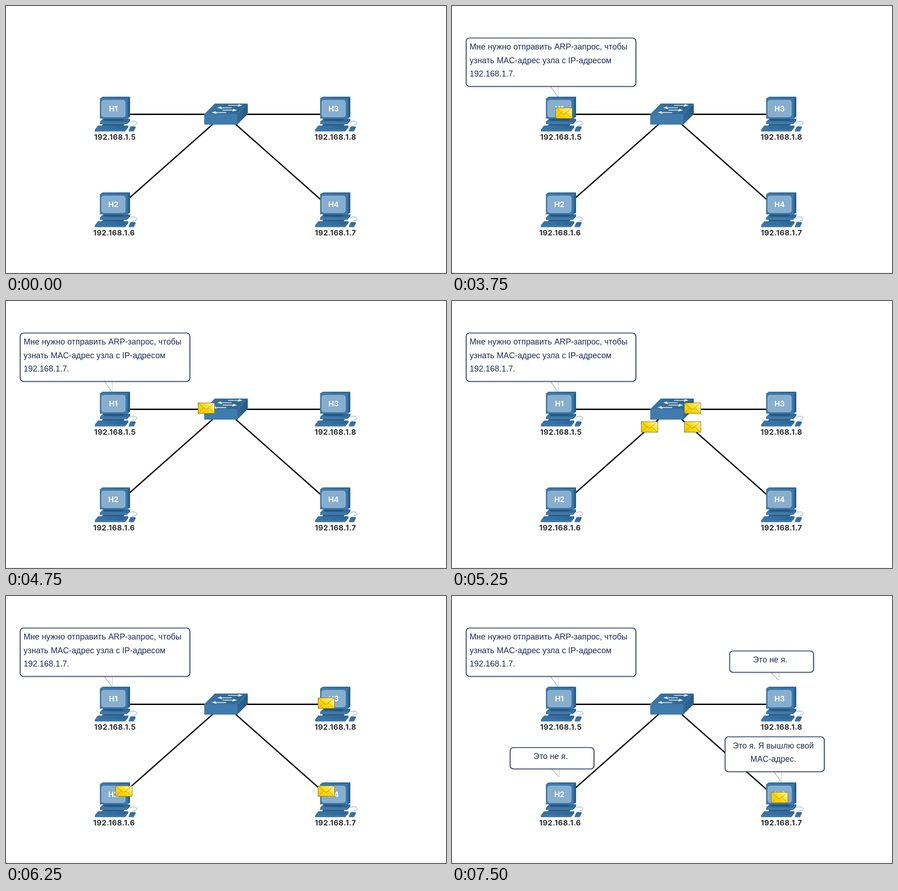
Animation of 961x583 px, one loop 8000 ms. Source, as an HTML page with a canvas:

```html
<!DOCTYPE html>
<html lang="ru">
<head>
<meta charset="utf-8">
<title>ARP</title>
<style>
html, body { margin: 0; width: 100%; height: 100%; overflow: hidden; background: #fff; }
canvas { display: block; width: 961px; height: 583px; }
</style>
</head>
<body>
<canvas id="stage" width="961" height="583"></canvas>
<script>
const ctx = document.getElementById('stage').getContext('2d');
const LOOP = 8000, STEP = 250;
const ASK = 1500, SEND = 3750, FLOOD = 5000, REPLY = 6500;
const NAVY = '#1c2b57';
const BOLD = '"Inter", sans-serif';
const BODY = '17.8px "Liberation Sans", Arial, sans-serif';
const LEFT = 194, RIGHT = 675, TOP = 198, BOTTOM = 407;

const hosts = [
  { x: LEFT, y: TOP, ip: '192.168.1.5', ipX: 238 },
  { x: LEFT, y: BOTTOM, ip: '192.168.1.6', ipX: 236 },
  { x: RIGHT, y: TOP, ip: '192.168.1.8', ipX: 719.5 },
  { x: RIGHT, y: BOTTOM, ip: '192.168.1.7', ipX: 719.5 }
];

function poly(fill, ...pts) {
  ctx.beginPath();
  for (let i = 0; i < pts.length; i += 2) ctx.lineTo(pts[i], pts[i + 1]);
  ctx.closePath();
  ctx.fillStyle = fill;
  ctx.fill();
}

function line(color, width, ...pts) {
  ctx.beginPath();
  for (let i = 0; i < pts.length; i += 2) ctx.lineTo(pts[i], pts[i + 1]);
  ctx.strokeStyle = color;
  ctx.lineWidth = width;
  ctx.stroke();
}

function fade(x0, y0, x1, y1, ...colors) {
  const g = ctx.createLinearGradient(x0, y0, x1, y1);
  colors.forEach((c, i) => g.addColorStop(i / (colors.length - 1), c));
  return g;
}

function text(str, x, y, font, color, align = 'center', spacing = 0) {
  ctx.font = font;
  ctx.fillStyle = color;
  ctx.textAlign = align;
  ctx.letterSpacing = spacing + 'px';
  ctx.fillText(str, x, y);
}

// A block seen from the front, its back edge moved by dx, -dy
function block(x, y, w, h, dx, dy) {
  const r = x + w, b = y + h;
  poly(fade(x, y, r, y - dy, '#3b77a6', '#2e6796'), x, y, x + dx, y - dy, r + dx, y - dy, r, y);
  poly(fade(r, 0, r + dx, 0, '#316a98', '#26587f'), r, y, r + dx, y - dy, r + dx, b - dy, r, b);
  poly('#3f7bab', x, y, r, y, r, b, x, b);
}

function computer(host, i) {
  ctx.save();
  ctx.translate(host.x, host.y);

  poly('#2a5c88', 18, 59, 66, 59, 60, 66, 14, 66);
  block(11, 55, 59, 5, 7, 7);
  poly('#28587f', 18, 47, 64, 47, 61, 53, 21, 53);
  block(11, 4, 60, 44, 6, 4);
  block(0, 72, 66, 4, 7, 9);

  ctx.beginPath();
  ctx.roundRect(15, 8, 51, 36, 4.5);
  ctx.fillStyle = '#86aece';
  ctx.fill();
  ctx.strokeStyle = '#a3c3db';
  ctx.lineWidth = 1.2;
  ctx.stroke();

  // Mouse and its cord
  ctx.beginPath();
  ctx.moveTo(77, 56);
  ctx.bezierCurveTo(83, 51, 92, 54, 92, 58);
  ctx.bezierCurveTo(91, 63, 80, 61, 82, 66);
  ctx.strokeStyle = '#6a96bb';
  ctx.lineWidth = 1;
  ctx.stroke();
  block(74, 73, 11, 3, 4, 8);
  ctx.restore();

  text('H' + (i + 1), host.x + 40.5, host.y + 32, '700 16px ' + BOLD, '#fff');
  text(host.ip, host.ipX, host.y + 94.4, '700 16.3px ' + BOLD, '#2c2c2c', 'center', 0.45);
}

function arrow(x, y, dir) {
  ctx.save();
  ctx.translate(x, y);
  ctx.scale(dir, 1);
  poly('#f1ede2', -16, -0.8, 7, -0.8, 7, -3, 16, 0, 5, 3, 6, 0.8, -16, 0.8);
  ctx.restore();
}

function networkSwitch() {
  block(433, 236, 72, 23, 23, 23);
  for (let i = 0; i < 4; i++) {
    const odd = i % 2;
    arrow(501 - 6 * i - 18 * odd, 217 + 5.2 * i, odd ? -1 : 1);
  }
}

function envelope(x, y) {
  const ink = '#a18a1c';
  ctx.save();
  ctx.translate(x, y);
  ctx.fillStyle = fade(33, -2, 10, 24, '#fff9d0', '#ffe84c', '#fbd500', '#f5cd00');
  ctx.fillRect(0, 0, 36, 24);
  line(ink, 0.9, 1, 23, 13, 11);
  line(ink, 0.9, 35, 23, 23, 11);
  ctx.beginPath();
  ctx.moveTo(1, 1);
  ctx.lineTo(14, 12.5);
  ctx.quadraticCurveTo(18, 16, 22, 12.5);
  ctx.lineTo(35, 1);
  ctx.stroke();
  ctx.strokeStyle = '#77702f';
  ctx.lineWidth = 1;
  ctx.strokeRect(0.5, 0.5, 36, 23);
  ctx.restore();
}

function bubble(x, y, w, h, tipX, tipY, align, ...lines) {
  const base = y + h;
  poly('#fff', tipX - 16, base, tipX + 1, base, tipX, tipY);
  line('#b9b9b9', 1.5, tipX - 16, base, tipX, tipY);
  line('#cfcfcf', 1.3, tipX + 1, base, tipX + 1, tipY);

  ctx.beginPath();
  ctx.roundRect(x, y, w, h, 7);
  ctx.save();
  ctx.shadowColor = 'rgba(0,0,0,0.3)';
  ctx.shadowBlur = 4;
  ctx.shadowOffsetX = ctx.shadowOffsetY = 1;
  ctx.fillStyle = '#fff';
  ctx.fill();
  ctx.restore();
  ctx.strokeStyle = NAVY;
  ctx.lineWidth = 1.7;
  ctx.stroke();

  const textX = align === 'left' ? x + 7.5 : x + w / 2 - 3;
  lines.forEach((s, i) => text(s, textX, y + 25.2 + 29.3 * i, BODY, NAVY, align, 0.06));
}

function question() {
  bubble(31, 70, 370.5, 105.5, 231, 198, 'left',
    'Мне нужно отправить ARP-запрос, чтобы',
    'узнать MAC-адрес узла с IP-адресом',
    '192.168.1.7.');
}

function answers() {
  bubble(606.5, 120, 183, 46.5, 713, 184, 'center', 'Это не я.');
  bubble(127, 331, 183, 46.5, 233.5, 395, 'center', 'Это не я.');
  bubble(596.5, 307.5, 216.5, 76, 719, 406, 'center', 'Это я. Я вышлю свой', 'MAC-адрес.');
}

// Envelopes advance at an even speed, once per step
function mail(t) {
  const y = 222;
  if (t < SEND) return;
  if (t < FLOOD) {
    const n = Math.floor((t - SEND) / STEP);
    envelope(Math.round(226 + 48.25 * n), y);
  } else if (t < REPLY) {
    const n = Math.floor((t - FLOOD) / STEP);
    const d = Math.round(3.5 + 43.5 * n);
    const drop = Math.round(d * 0.87);
    envelope(460 + d, y);
    envelope(460 - d, y + drop);
    envelope(460 + d, y + drop);
  } else {
    envelope(697, 428);
  }
}

function draw(t) {
  ctx.fillStyle = '#fff';
  ctx.fillRect(0, 0, 961, 583);
  line('#e4e4e4', 1, 0, 582.5, 961, 582.5);

  line('#000', 3, 268, 236.5, 690, 236.5);
  line('#000', 3, 268, 420.5, 454, 256);
  line('#000', 3, 499, 256, 690, 425);

  networkSwitch();
  hosts.forEach(computer);
  if (t >= ASK) question();
  if (t >= REPLY) answers();
  mail(t);
}

const start = performance.now();
function tick() {
  draw((performance.now() - start) % LOOP);
  requestAnimationFrame(tick);
}
tick();
</script>
</body>
</html>
```
